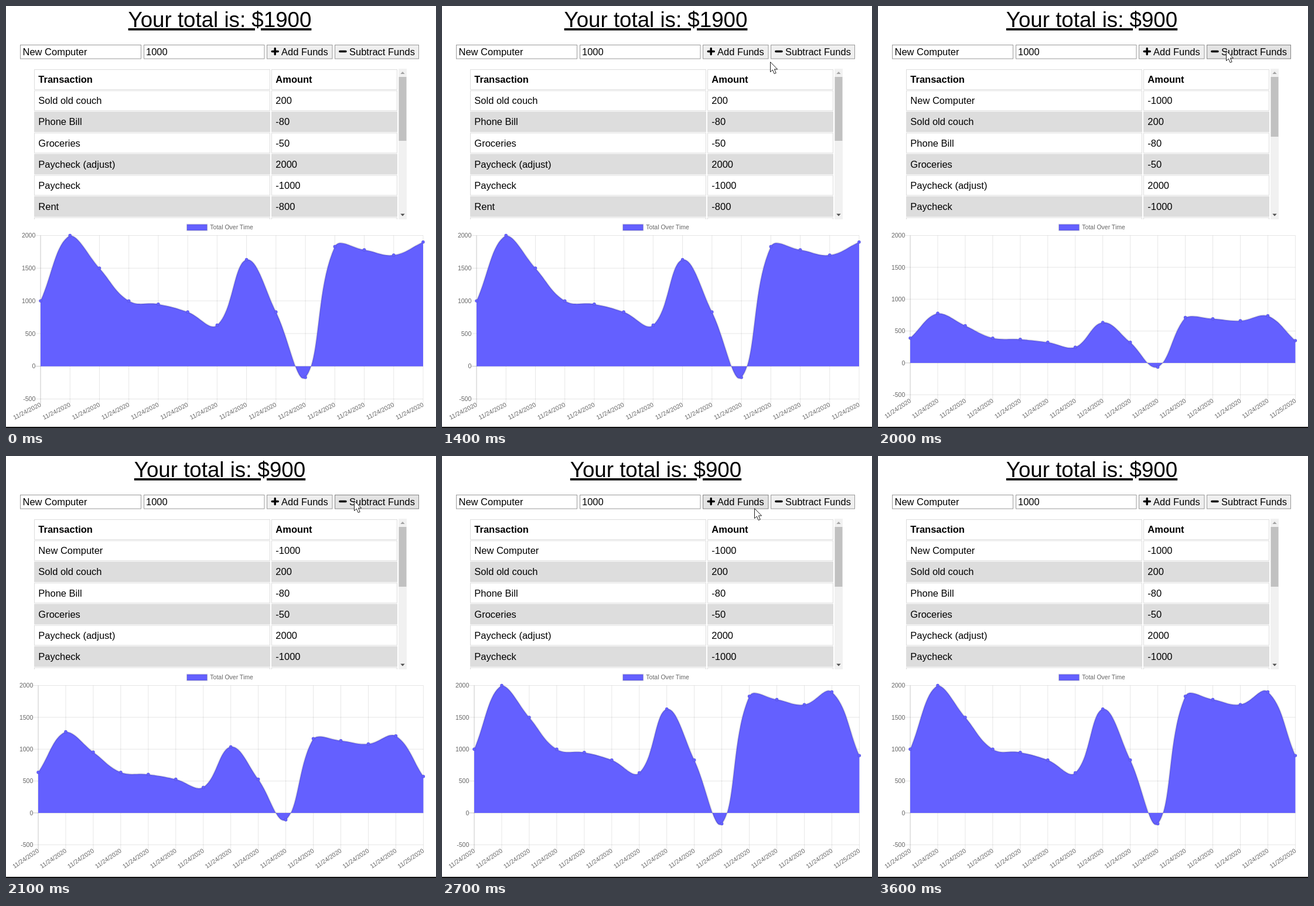
An HTML page for the animation above (3.8 s loop, 734x720 px).

```html
<!DOCTYPE html>
<html lang="en">
<head>
<meta charset="utf-8">
<title>Budget tracker</title>
<style>
html, body { margin: 0; width: 100%; height: 100%; overflow: hidden; background: #fff; }
svg { display: block; width: 734px; height: 720px; font: 16.5px "Liberation Sans", Arial, sans-serif; }
.title { font-size: 36.7px; text-anchor: middle; text-decoration: underline; }
.bold { font-weight: bold; }
.chart { font-size: 10.5px; fill: #666; }
.end { text-anchor: end; }
</style>
</head>
<body>
<svg id="stage" viewBox="0 0 734 720"></svg>
<script>
const LOOP = 3800, CLICK = 2000;
const BLUE = '#6460ff';
const stage = document.getElementById('stage');

// Each step: time, then the pointer tip when it is visible
const steps = [
  [0], [100], [300], [400], [600, 650, 600], [700, 560, 330], [800, 475, 136],
  [1000, 494, 130], [1100, 512, 121], [1300, 540, 106], [1400, 560, 95], [1500, 578, 84],
  [1700, 594, 76], [1800, 594, 76], [2000, 594, 76], [2100, 594, 76], [2200, 588, 76],
  [2400, 547, 75], [2500, 538, 80], [2700, 533, 89], [2800, 540, 230], [2900, 556, 470],
  [3100], [3200], [3400], [3500], [3600]
];

const purchases = [
  ['New Computer', '-1000'], ['Sold old couch', '200'], ['Phone Bill', '-80'], ['Groceries', '-50'],
  ['Paycheck (adjust)', '2000'], ['Paycheck', '-1000'], ['Rent', '-800']
];
const totals = [1000, 2000, 1500, 1000, 950, 830, 630, 1630, 830, -170, 1830, 1780, 1700, 1900, 900];

const rect = (x, y, w, h, fill, stroke = 'none') =>
  `<rect x="${x}" y="${y}" width="${w}" height="${h}" fill="${fill}" stroke="${stroke}"/>`;
const text = (x, y, str, cls = '') => `<text x="${x}" y="${y}" class="${cls}">${str}</text>`;
const line = (x1, y1, x2, y2, alpha) =>
  `<path d="M${x1} ${y1}L${x2} ${y2}" stroke="rgba(0,0,0,${alpha})" stroke-width=".9"/>`;
const clamp = (v, lo, hi) => Math.min(hi, Math.max(lo, v));
const mix = (a, b, p) => a + (b - a) * p;

const buttonLooks = {
  idle: ['#efefef', '#999'],
  hover: ['#e3e3e3', '#858585'],
  active: ['#f5f5f5', '#b4b4b4']
};

function form(addLook, subtractLook) {
  return rect(24.5, 66.5, 206, 23.5, '#fff', '#9a9a9a') + text(28.5, 84, 'New Computer') +
    rect(235.5, 66.5, 205.5, 23.5, '#fff', '#9a9a9a') + text(239, 84, '1000') +
    rect(445.5, 66.5, 111.5, 23.5, ...buttonLooks[addLook]) + text(470, 84, 'Add Funds') +
    rect(561.5, 66.5, 143, 23.5, ...buttonLooks[subtractLook]) + text(586, 84, 'Subtract Funds') +
    '<path d="M454.2 77.5H464.3M459.2 72.5V82.6M569.8 77.5H580" stroke="#000" stroke-width="3.4" stroke-linecap="round"/>';
}

function table(rows, thumbHeight) {
  const row = ([name, amount], i) => {
    const y = 108.5 + 36.1 * i;
    const fill = i && i % 2 === 0 ? '#ddd' : '#fff';
    const cls = i ? '' : 'bold';
    return rect(48.5, y, 402, 34, fill, '#ddd') + rect(453.5, y, 214, 34, fill, '#ddd') +
      text(55.3, y + 22.7, name, cls) + text(460.3, y + 22.7, amount, cls);
  };
  return '<clipPath id="view"><path d="M40 100H690V364H40Z"/></clipPath><g clip-path="url(#view)">' +
    [['Transaction', 'Amount'], ...rows.slice(0, 6), ['', '']].map(row).join('') + '</g>' +
    rect(670, 107, 14, 257, '#f1f1f1') + rect(670.5, 121, 13, thumbHeight, '#c1c1c1') +
    '<path d="M673.3 116L677 112L680.7 116Z" fill="#a3a3a3"/><path d="M673.3 354.5L677 358.5L680.7 354.5Z" fill="#505050"/>';
}

// Spline handles scaled by the distance to each neighbour, kept inside the plot
function withHandles(points, area) {
  return points.map(([x, y], i) => {
    const prev = points[i - 1] || [x, y], next = points[i + 1] || [x, y];
    const before = Math.hypot(x - prev[0], y - prev[1]);
    const after = Math.hypot(next[0] - x, next[1] - y);
    const handle = k => [
      clamp(x + k * (next[0] - prev[0]), area.left, area.right),
      clamp(y + k * (next[1] - prev[1]), area.top, area.bottom)
    ];
    return [...handle(-0.4 * before / (before + after)), x, y, ...handle(0.4 * after / (before + after))];
  });
}

function chart(data, area, angle, progress) {
  const { left, right, top, bottom } = area;
  const tick = 8.75;
  const px = i => left + (right - left) * i / (data.length - 1);
  const py = v => top + (2000 - v) * (bottom - top) / 2500;
  const base = py(0);

  let out = rect(308.8, 372.6, 34.6, 10.4, BLUE) +
    '<rect x="308.8" y="372.6" width="34.6" height="10.4" fill="none" stroke="rgba(0,0,0,.1)" stroke-width="2.2"/>' +
    text(348.3, 381.2, 'Total Over Time');
  for (let v = -500; v <= 2000; v += 500) {
    out += line(left - tick, py(v), right, py(v), v ? 0.11 : 0.25) +
      text(left - tick, py(v) + 3.7, v, 'end');
  }
  data.forEach((_, i) => {
    const x = px(i), y = bottom + tick;
    out += line(x, top, x, y, i ? 0.11 : 0.25) +
      `<text class="end" dy=".35em" transform="translate(${x} ${y}) rotate(${-angle})">11/${i < 14 ? 24 : 25}/2020</text>`;
  });

  const flat = withHandles(data.map((_, i) => [px(i), base]), area);
  const full = withHandles(data.map((v, i) => [px(i), py(v)]), area);
  const nodes = full.map((node, i) => node.map((v, j) => mix(flat[i][j], v, progress)));
  const curve = nodes.slice(1).reduce(
    (d, n, i) => `${d}C${nodes[i].slice(4)} ${n.slice(0, 2)} ${n.slice(2, 4)}`,
    `M${nodes[0].slice(2, 4)}`);
  out += `<path d="${curve}L${right} ${base}L${left} ${base}Z" fill="${BLUE}"/>` +
    `<path d="${curve}" fill="none" stroke="rgba(0,0,0,.1)" stroke-width="2.6"/>`;
  for (const n of nodes) {
    out += `<circle cx="${n[2]}" cy="${n[3]}" r="2.7" fill="${BLUE}" stroke="rgba(0,0,0,.1)" stroke-width=".9"/>`;
  }
  return `<g class="chart">${out}</g>`;
}

function pointer(x, y) {
  return `<path transform="translate(${x} ${y})" d="M.5 .5V17.5L4.4 14L7.2 20.6L10.2 19.3L7.4 12.9H12.6Z" fill="#fff" stroke="#222"/>`;
}

function draw([time, x, y]) {
  const done = time >= CLICK;
  const subtractLook = time === 1800 ? 'active' : time >= 1500 && time <= 2400 ? 'hover' : 'idle';
  const addLook = time === 2500 || time === 2700 ? 'hover' : 'idle';
  const elapsed = clamp(0.116 + (time - CLICK) / 930, 0, 1);
  const growth = 1 - (1 - elapsed) ** 4;

  stage.innerHTML =
    text(365, 36, `Your total is: $${done ? 900 : 1900}`, 'title') +
    form(addLook, subtractLook) +
    table(done ? purchases : purchases.slice(1), done ? 102 : 109) +
    (done
      ? chart(totals, { left: 55, right: 712.4, top: 391.5, bottom: 663.3 }, 34, growth)
      : chart(totals.slice(0, 14), { left: 59, right: 712, top: 391.5, bottom: 670.5 }, 27, 1)) +
    rect(0, 718, 734, 2, '#111') +
    (x === undefined ? '' : pointer(x, y));
}

const start = performance.now();
let shown;
function tick() {
  const now = (performance.now() - start) % LOOP;
  const step = steps.findLast(s => s[0] <= now) || steps[0];
  if (step !== shown) draw(shown = step);
  requestAnimationFrame(tick);
}
tick();
</script>
</body>
</html>
```
